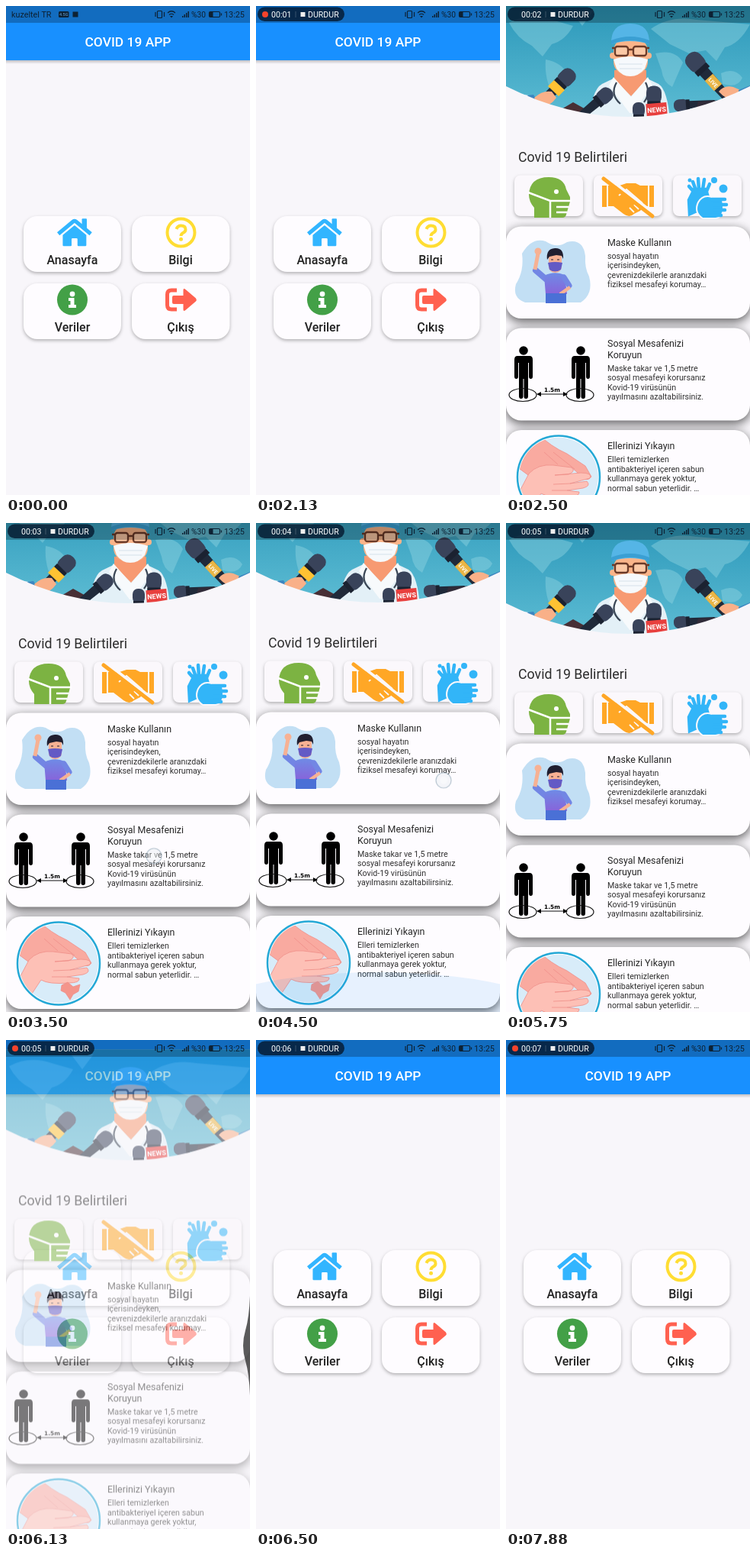
Animation of 320x640 px, one loop 8 s. Source, as an HTML page:

```html
<!DOCTYPE html>
<html lang="tr">
<head>
<meta charset="utf-8">
<title>Covid 19 App</title>
<style>
html, body { margin: 0; height: 100%; overflow: hidden; background: #f8f6fa; }
svg { font-family: Roboto, "Noto Sans", sans-serif; }
#stage { display: block; width: 100vw; height: 100vh; }

.tile, .chip { fill: #fefcff; filter: drop-shadow(0 2px 2px rgba(0,0,0,.28)); }
.chip { fill: #fbf8fc; }
.card { fill: #fefcff; filter: drop-shadow(0 4px 7px rgba(0,0,0,.65)); }
.label { font-size: 16px; font-weight: 500; fill: #212121; text-anchor: middle; }
.head { font-size: 12.44px; fill: #262626; }
.body { font-size: 10.67px; fill: #303030; }
.status { font-size: 10.8px; fill: #0d2133; }
.pill { font-size: 10.6px; fill: #fff; }

/* every part shares one 8 s clock */
.run { animation: 8s linear infinite; }
#page { animation-name: fade; }
#slide { animation-name: slide; }
#scroll { animation-name: scroll; }
#touch { animation-name: touch; }
#carrier { animation-name: carrier; animation-timing-function: step-end; }
#pill { animation-name: pill; animation-timing-function: step-end; }
#rec { animation-name: blink; animation-timing-function: step-end; }
#clock { animation-name: clock; animation-timing-function: step-end; }
#glowEnd { animation-name: glowEnd; transform-origin: 160px 640px; }
#glowTop { animation-name: glowTop; transform-origin: 160px 0; }
#edge { animation-name: edge; transform-origin: 320px 400px; }

@keyframes fade {
  0% { opacity: 0; }
  27.375% { opacity: 0; animation-timing-function: cubic-bezier(.42,0,1,1); }
  31.125% { opacity: 1; }
  75.4% { opacity: 1; animation-timing-function: cubic-bezier(0,0,.58,1); }
  79.15%, 100% { opacity: 0; }
}
@keyframes slide {
  0% { transform: translateY(160px); }
  27.375% { transform: translateY(160px); animation-timing-function: cubic-bezier(.4,0,.2,1); }
  31.125% { transform: none; }
  75.4% { transform: none; animation-timing-function: cubic-bezier(.8,0,.6,1); }
  79.15%, 100% { transform: translateY(160px); }
}
@keyframes scroll {
  0%, 38.2% { transform: translateY(0); animation-timing-function: ease-out; }
  43.75% { transform: translateY(-40px); }
  44.2%, 58.5% { transform: translateY(-41px); animation-timing-function: ease-in-out; }
  62.25%, 100% { transform: translateY(0); }
}
@keyframes touch {
  0%, 23.74% { transform: translate(98px,310px); opacity: 0; }
  23.75%, 26.5% { transform: translate(98px,310px); opacity: 1; }
  26.51%, 37.4% { transform: translate(190px,492px); opacity: 0; }
  37.5% { transform: translate(190px,492px); opacity: 1; }
  43.75% { transform: translate(194px,436px); opacity: 1; }
  45.6% { transform: translate(198px,405px); opacity: 1; }
  45.7%, 53% { transform: translate(238px,410px); opacity: 0; }
  53.1% { transform: translate(238px,410px); opacity: 1; }
  56.25% { transform: translate(246px,337px); opacity: 1; }
  57.4% { transform: translate(248px,315px); opacity: 1; }
  57.5%, 57.9% { transform: translate(206px,408px); opacity: 0; }
  58% { transform: translate(206px,408px); opacity: 1; }
  62.5% { transform: translate(208px,475px); opacity: 1; }
  65.5% { transform: translate(210px,525px); opacity: 1; }
  65.6%, 93.74% { transform: translate(109px,401px); opacity: 0; }
  93.75%, 98.2% { transform: translate(109px,401px); opacity: 1; }
  98.21%, 100% { transform: translate(109px,401px); opacity: 0; }
}
@keyframes carrier { 0% { opacity: 1; } 1.625%, 100% { opacity: 0; } }
@keyframes pill { 0% { opacity: 0; } 1.625%, 100% { opacity: 1; } }
@keyframes blink {
  0%, 12.5%, 25%, 37.5%, 50%, 62.5%, 75%, 87.5% { opacity: 1; }
  6.25%, 18.75%, 31.25%, 43.75%, 56.25%, 68.75%, 81.25%, 92.25% { opacity: 0; }
  98.45%, 100% { opacity: 1; }
}
@keyframes clock {
  0% { transform: none; }
  13.25% { transform: translateY(-24px); }
  27.5% { transform: translateY(-48px); }
  39.5% { transform: translateY(-72px); }
  52% { transform: translateY(-96px); }
  64.5% { transform: translateY(-120px); }
  77.5% { transform: translateY(-144px); }
  87.5%, 100% { transform: translateY(-168px); }
}
@keyframes glowEnd {
  0%, 44.2% { opacity: 0; transform: scaleY(.2); }
  46% { opacity: 1; transform: scaleY(.8); }
  50%, 54.5% { opacity: 0; transform: scaleY(.2); }
  56.25%, 57.5% { opacity: 1; transform: scaleY(1); }
  62.5% { opacity: .5; transform: scaleY(.5); }
  66%, 100% { opacity: 0; transform: scaleY(.2); }
}
@keyframes glowTop {
  0%, 62.5% { opacity: 0; transform: scaleY(.2); }
  65.5% { opacity: 1; transform: scaleY(1); }
  69%, 100% { opacity: 0; transform: scaleY(.2); }
}
@keyframes edge {
  0%, 72.2% { transform: scaleX(0); }
  74.4%, 76.75% { transform: scaleX(1); }
  78.25%, 100% { transform: scaleX(0); }
}
</style>
</head>
<body>
<svg id="stage" viewBox="0 0 320 640" preserveAspectRatio="none">
<defs>
  <linearGradient id="sky" x2="0" y2="1">
    <stop stop-color="#2c98ba"/><stop offset="1" stop-color="#5ebdd4"/>
  </linearGradient>
  <linearGradient id="shirt" x2="0" y2="1">
    <stop stop-color="#6f8be6"/><stop offset="1" stop-color="#8764da"/>
  </linearGradient>
  <linearGradient id="barShade" x2="0" y2="1">
    <stop stop-opacity=".22"/><stop offset="1" stop-opacity="0"/>
  </linearGradient>
  <clipPath id="arc"><path d="M0 0H320V105Q160 185 0 105z"/></clipPath>
  <clipPath id="disc"><circle cx="69" cy="616.500" r="52"/></clipPath>
  <g id="mic">
    <path d="M-5 10H5L4 44H-4z" fill="#202a3a"/>
    <rect x="-8" y="-10" width="16" height="19" rx="7" fill="#39435a"/>
    <path d="M-7 6H7V11H-7z" fill="#1b2231"/>
  </g>
  <g id="person">
    <circle cy="451" r="5.800"/>
    <path d="M-8 458H8Q12 458 12 463V485Q12 488 9.500 488T7 485V467H6V511Q6 514 3.200 514T.5 511V488H-.5V511Q-.5 514-3.200 514T-6 511V467H-7V485Q-7 488-9.500 488T-12 485V463Q-12 458-8 458z"/>
    <ellipse cx="-1" cy="509" rx="18" ry="8.500" fill="none" stroke="#111" stroke-width="1.200"/>
  </g>
</defs>

<g id="home">
  <rect width="320" height="640" fill="#f8f6fa"/>
  <rect y="71" width="320" height="5" fill="url(#barShade)"/>
  <rect width="320" height="71" fill="#1890ff"/>
  <text x="160" y="53" font-size="17.4" font-weight="500" fill="#fff" text-anchor="middle">COVID 19 APP</text>

  <rect class="tile" x="23" y="275" width="128" height="73" rx="18"/>
  <rect class="tile" x="165" y="275" width="128.500" height="73" rx="18"/>
  <rect class="tile" x="23" y="363" width="128" height="73" rx="18"/>
  <rect class="tile" x="165" y="363" width="128.500" height="73" rx="18"/>
  <text class="label" x="87" y="338">Anasayfa</text>
  <text class="label" x="229" y="338">Bilgi</text>
  <text class="label" x="87" y="426">Veriler</text>
  <text class="label" x="229" y="426">Çıkış</text>

  <g transform="translate(66.700 275.600) scale(.0805)" fill="#32b5ff">
    <path d="M24 280L270 78Q288 64 306 78L552 280" fill="none" stroke="#32b5ff" stroke-width="64"/>
    <rect x="408" y="32" width="80" height="170" rx="12"/>
    <path d="M96 300L280 148Q288 142 296 148L480 300V464Q480 480 464 480H352Q336 480 336 464V368Q336 352 320 352H256Q240 352 240 368V464Q240 480 224 480H112Q96 480 96 464z"/>
  </g>
  <g fill="none" stroke="#ffdd33" stroke-width="4">
    <circle cx="229.500" cy="296.500" r="18"/>
    <path d="M223.500 292Q225 287.500 229.500 287.500Q235.500 287.500 235.500 292.500Q235.500 295.500 232 297Q229.500 298.500 229.500 301"/>
    <circle cx="229.500" cy="305.300" r="2.500" fill="#ffdd33" stroke="none"/>
  </g>
  <circle cx="87" cy="384.500" r="20" fill="#43a047"/>
  <g fill="#fff">
    <circle cx="87" cy="377" r="3.400"/>
    <path d="M82 382H89.500V391H92V395H82V391H84.500V386H82z"/>
  </g>
  <g fill="#ff6150">
    <path d="M224 372H217Q211.500 372 211.500 377.500V391.500Q211.500 397 217 397H224" fill="none" stroke="#ff6150" stroke-width="5"/>
    <path d="M220 379H232.500V372Q232.500 368.500 235.500 371L249 382.500Q250.500 384.500 249 386.500L235.500 398Q232.500 400.500 232.500 397V390H220Q218 390 218 388V381Q218 379 220 379z"/>
  </g>
</g>

<g id="page" class="run"><g id="slide" class="run">
  <rect width="320" height="640" fill="#f8f6fa"/>
  <g id="scroll" class="run">
    <g clip-path="url(#arc)">
      <rect width="320" height="150" fill="url(#sky)"/>
      <path fill="#8fd2df" opacity=".45" d="M4 22Q30 8 60 18L88 26Q78 45 60 50L48 66L34 52Q14 42 4 22zM52 70Q74 74 80 90L62 116Q50 96 52 70zM85 6H115L100 26zM190 30Q215 12 250 18L320 24Q306 50 287 54L276 72L262 58L240 62L215 50zM196 62Q222 56 232 74L218 106Q206 100 204 84zM282 88Q300 80 310 94Q304 108 284 102z"/>
      <path d="M110 150Q112 110 126 102L147 92H179L200 102Q212 110 215 150z" fill="#e3f0f7"/>
      <path d="M142 84H184V96L164 118L142 96z" fill="#f79a72"/>
      <path d="M141 93L164 119L186 93L192 104L166 140H162L135 104z" fill="#f7fafc"/>
      <path d="M145 100Q136 116 150 128M183 100Q190 114 181 126" fill="none" stroke="#3b4756" stroke-width="2.200"/>
      <g fill="#fab489">
        <circle cx="140" cy="65" r="4"/><circle cx="187" cy="65" r="4"/>
        <rect x="141" y="42" width="45" height="48" rx="17"/>
      </g>
      <path d="M138 50Q137 23 163 23Q189 23 188 50Q163 42 138 50z" fill="#55b5e6"/>
      <path d="M138 50Q163 40 188 50V45Q163 35 138 45z" fill="#3a9fd3"/>
      <path d="M141 70Q152 66 163 66T186 70L182 82Q174 92 163 92T145 82z" fill="#f6f9fc"/>
      <path d="M148 76H179M149 82H178" stroke="#d5e1ea"/>
      <g fill="#fbc9a6" stroke="#6b3a28" stroke-width="2.300">
        <rect x="143" y="53" width="17" height="12" rx="3"/>
        <rect x="167" y="53" width="17" height="12" rx="3"/>
        <path d="M139 55H143M160 57H167M184 55H188"/>
      </g>
      <path d="M0 112L30 117L40 134L34 150H0z" fill="#dcebf4"/>
      <path d="M28 117L36 116L46 132L39 136z" fill="#3c86c0"/>
      <use href="#mic" transform="translate(79 94) rotate(45) scale(1.300)"/>
      <path d="M63 97L77 110L69 118L55 105z" fill="#ffc233"/>
      <path d="M37 120Q48 110 60 112L66 120Q58 132 44 133z" fill="#f9b088"/>
      <path d="M56 145L88 126L106 136L98 152z" fill="#482f35"/>
      <use href="#mic" transform="translate(129 118) rotate(50) scale(1.200)"/>
      <use href="#mic" transform="translate(174 136)"/>
      <use href="#mic" transform="translate(194 117) scale(1.250)"/>
      <g transform="rotate(-5 198 135)">
        <rect x="184" y="127" width="27" height="17" fill="#e8403e"/>
        <text x="197.500" y="139" font-size="9" font-weight="700" fill="#fff" text-anchor="middle">NEWS</text>
      </g>
      <use href="#mic" transform="translate(230 130) rotate(-94)"/>
      <path d="M252 125L300 122L320 130V150H245z" fill="#302b38"/>
      <use href="#mic" transform="translate(249 74) rotate(-42) scale(1.450)"/>
      <g transform="translate(272 100) rotate(48)">
        <rect x="-9" y="-7" width="18" height="14" fill="#e9b545"/>
        <text y="3" font-size="7" font-weight="700" fill="#fff" text-anchor="middle">LIVE</text>
      </g>
      <path d="M279 112Q286 103 298 106L312 112L306 124Q290 125 279 112z" fill="#f9b088"/>
      <path d="M305 110L320 104V124L306 124z" fill="#3c86c0"/>
    </g>

    <text x="16" y="204" font-size="17.780" fill="#2c2c2c">Covid 19 Belirtileri</text>
    <rect class="chip" x="11" y="221.500" width="90" height="53.500" rx="8"/>
    <rect class="chip" x="115" y="221.500" width="90" height="53.500" rx="8"/>
    <rect class="chip" x="219" y="221.500" width="90" height="53.500" rx="8"/>

    <g fill="#7cb342">
      <path d="M37 277V264Q30 256 30 247Q31 224 56 224Q76 224 79 240L84 250V256L79 273Q78 277 74 277z"/>
      <circle cx="66" cy="243" r="3" fill="#fff"/>
      <path d="M29 244L58 255H86M58 255V277M66 263H82M66 270H80" fill="none" stroke="#fff" stroke-width="2.500"/>
    </g>
    <g fill="#ffa726">
      <path d="M126 235H132V263H126zM188 235H194V263H188zM134 235H149L158 232H170L176 235H186V262H181L176 268L168 272Q162 278 154 272L141 262H134z"/>
      <path d="M148 248L158 240L179 258M168 270L162 264M174 266L168 260" fill="none" stroke="#fbf8fc" stroke-width="1.800"/>
      <path d="M130 222L196 273" stroke="#fbf8fc" stroke-width="4"/>
      <path d="M128 226L192 275" stroke="#ffa726" stroke-width="5" stroke-linecap="round"/>
    </g>
    <g fill="#32b5f8" stroke="#32b5f8" stroke-width="4.500" stroke-linecap="round">
      <path d="M240 254L247 240L262 240L266 254L250 268L241 272z"/>
      <path d="M247 244L240 236M249 241L245 230M253 240L252 226M258 240L260 227M262 245L267 233" fill="none"/>
      <path d="M252 257Q258 246 270 250L284 254Q288 276 275 278H258Q246 270 252 257z" stroke="#fbf8fc" stroke-width="2"/>
      <path d="M270 253L287 253M273 260H289M273 267H287M268 274H282" fill="none"/>
      <g stroke="none">
        <circle cx="273" cy="228" r="4"/><circle cx="285" cy="239" r="5.500"/><circle cx="241" cy="228" r="2.500"/>
      </g>
    </g>

    <rect class="card" y="288.500" width="320" height="120.500" rx="20"/>
    <rect class="card" y="421.500" width="320" height="121" rx="20"/>
    <rect class="card" y="555" width="320" height="121" rx="20"/>

    <path d="M21 324Q34 302 52 308Q67 318 80 309Q101 304 104 327Q103 343 109 354Q115 377 98 388H25Q8 382 13 364Q24 347 21 324z" fill="#c2dff4"/>
    <path d="M53 358L39 346" stroke="#7286e4" stroke-width="8" stroke-linecap="round"/>
    <path d="M38 345L42 324" stroke="#f7b193" stroke-width="5"/>
    <circle cx="42" cy="321" r="4.500" fill="#f7b193"/>
    <path d="M50 353Q64 346 77 352L80 377H52z" fill="url(#shirt)"/>
    <path d="M76 355L83 366" stroke="#7286e4" stroke-width="7" stroke-linecap="round"/>
    <path d="M84 368L71 377" stroke="#f7b193" stroke-width="4.500"/>
    <path d="M52 376H79V389H52z" fill="#4a70d6"/>
    <rect x="56" y="321" width="17" height="28" rx="8" fill="#f7b193"/>
    <path d="M54 332Q52 318 64 317Q76 316 75 331L73 327L66 326L57 328z" fill="#211f30"/>
    <path d="M59 332H62M67 332H70" stroke="#211f30" stroke-width="1.200"/>
    <path d="M55 336Q64 334 74 336L72 345Q64 350 57 345z" fill="#635ac5"/>
    <text class="head" x="133" y="313.500">Maske Kullanın</text>
    <text class="body"><tspan x="133" y="330.500">sosyal hayatın</tspan><tspan x="133" dy="12.500">içerisindeyken,</tspan><tspan x="133" dy="12.500">çevrenizdekilerle aranızdaki</tspan><tspan x="133" dy="12.500">fiziksel mesafeyi korumay…</tspan></text>

    <g fill="#000">
      <use href="#person" x="23"/>
      <use href="#person" x="98"/>
      <path d="M44 508H77" stroke="#111" stroke-width="1.200"/>
      <path d="M40 508L46 505V511zM81 508L75 505V511z"/>
      <text x="60.500" y="505" font-family="DejaVu Sans, sans-serif" font-size="7.400" font-weight="700" text-anchor="middle">1.5m</text>
    </g>
    <text class="head"><tspan x="133" y="446">Sosyal Mesafenizi</tspan><tspan x="133" dy="14.600">Koruyun</tspan></text>
    <text class="body"><tspan x="133" y="477.800">Maske takar ve 1,5 metre</tspan><tspan x="133" dy="12.500">sosyal mesafeyi korursanız</tspan><tspan x="133" dy="12.500">Kovid-19 virüsünün</tspan><tspan x="133" dy="12.500">yayılmasını azaltabilirsiniz.</tspan></text>

    <circle cx="69" cy="616.500" r="54" fill="#fff" stroke="#24a8d6" stroke-width="2.500"/>
    <g clip-path="url(#disc)" stroke="#ef8f88" stroke-width=".8">
      <circle cx="69" cy="616.500" r="52" fill="#d8ecf9" stroke="none"/>
      <path d="M10 600L42 560Q58 576 80 586L104 602L112 616Q108 622 102 618L86 604L64 612L40 622z" fill="#f9aaa0"/>
      <path d="M10 650L30 612Q42 599 62 601L86 604Q92 609 82 613L64 614L98 611Q114 611 110 618L84 625L106 622Q112 628 101 631L80 634L96 636Q97 642 82 642Q56 644 46 638L26 668z" fill="#fdc0b6"/>
      <path d="M62 584L90 606M50 584L68 600M62 626L84 625M60 634L80 634" fill="none"/>
      <path d="M73 645L81 641L88 647L97 644L95 653L88 657L84 664L78 655L72 652z" fill="#f4958b"/>
    </g>
    <text class="head" x="133" y="580">Ellerinizi Yıkayın</text>
    <text class="body"><tspan x="133" y="597">Elleri temizlerken</tspan><tspan x="133" dy="12.500">antibakteriyel içeren sabun</tspan><tspan x="133" dy="12.500">kullanmaya gerek yoktur,</tspan><tspan x="133" dy="12.500">normal sabun yeterlidir. …</tspan></text>
  </g>
  <g fill="#2196f3" fill-opacity=".1">
    <ellipse id="glowEnd" class="run" cx="160" cy="660" rx="260" ry="72"/>
    <ellipse id="glowTop" class="run" cx="160" cy="-20" rx="260" ry="72"/>
  </g>
</g></g>

<path id="edge" class="run" d="M320 335Q319 363 314 380Q308 400 314 420Q319 437 320 465z" fill="#333" fill-opacity=".8"/>

<g class="status">
  <rect width="320" height="22" fill="#000" fill-opacity=".25"/>
  <g id="carrier" class="run">
    <text x="7" y="15">kuzeltel TR</text>
    <rect x="69" y="7" width="13.500" height="8" rx="1.500"/>
    <text x="75.700" y="13.200" font-size="5.500" fill="#6da6d8" text-anchor="middle">4.5G</text>
    <rect x="87.500" y="7.500" width="7" height="7"/>
  </g>
  <g fill="none" stroke="#0d2133" stroke-width="1.200">
    <rect x="198.500" y="6.500" width="6" height="9" rx="1"/>
    <path d="M196 8V14M207.500 8V14M212 9Q217 4.500 222 9M214 11.500Q217 9 220 11.500"/>
    <rect x="266.500" y="7.500" width="14" height="7" rx="1.500"/>
    <path d="M282.500 9.500V12.500"/>
  </g>
  <path d="M215 13H219L217 15.500zM231 13H232.500V15H231zM233.500 11H235V15H233.500zM236 9H237.500V15H236zM238.500 7H240V15H238.500zM267 8H271.500V14H267z"/>
  <text x="243" y="15" font-size="10.200">%30</text>
  <text x="286" y="15">13:25</text>
</g>

<g id="pill" class="run pill">
  <rect x="2" y="1.500" width="114" height="18.500" rx="9.250" fill="#051a30" fill-opacity=".82"/>
  <circle id="rec" class="run" cx="12" cy="11" r="4" fill="#f4432c"/>
  <svg x="20" y="2" width="28" height="18" overflow="hidden">
    <text id="clock" class="run"><tspan x="0" y="13">00:00</tspan><tspan x="0" dy="24">00:01</tspan><tspan x="0" dy="24">00:02</tspan><tspan x="0" dy="24">00:03</tspan><tspan x="0" dy="24">00:04</tspan><tspan x="0" dy="24">00:05</tspan><tspan x="0" dy="24">00:06</tspan><tspan x="0" dy="24">00:07</tspan></text>
  </svg>
  <path d="M52 7V15" stroke="#fff" stroke-opacity=".2"/>
  <rect x="58.500" y="8" width="6" height="6" fill="#eee"/>
  <text x="68" y="15">DURDUR</text>
</g>

<g id="touch" class="run">
  <circle r="10" fill="#dfe5ea" fill-opacity=".3" stroke="#93a9b8" stroke-opacity=".65" stroke-width="1.200"/>
  <circle r="5" fill="#fff" fill-opacity=".3"/>
</g>
</svg>
</body>
</html>
```
